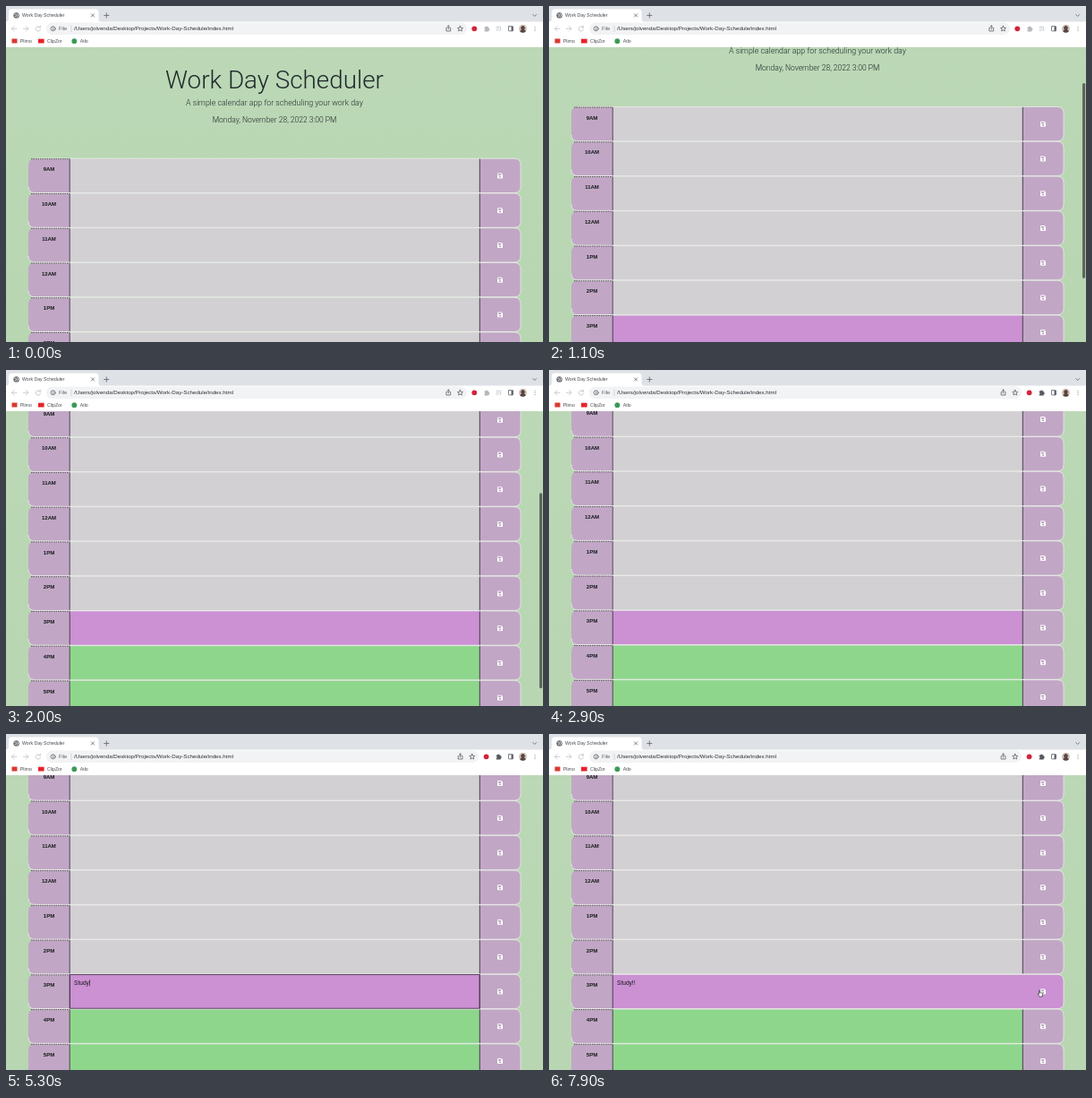
An HTML page that plays this animation: 600 by 375 pixels, repeating every 8 s.

```html
<!DOCTYPE html>
<html lang="en">
<head>
<meta charset="utf-8">
<title>Work Day Scheduler</title>
<style>
  html, body { margin: 0; width: 100%; height: 100%; overflow: hidden; }
  svg { display: block; width: 100vw; height: 100vh; }
  text { font-family: "Liberation Sans", Arial, sans-serif; fill: #15181b; white-space: pre; }
  .title, .lead { font-family: Roboto, "Helvetica Neue", sans-serif; font-weight: 300; text-anchor: middle; fill: #202a2c; }
  .title { font-size: 27.8px; }
  .lead { font-size: 8.8px; }
  .hour { font-size: 6px; font-weight: 700; text-anchor: middle; }
  .small { font-size: 5.2px; fill: #45494d; }
  .url { font-size: 6.2px; fill: #2c2f33; }
  .entry { font-size: 6.6px; }
  .icon { fill: none; stroke: #5f6368; stroke-width: .8; stroke-linecap: round; stroke-linejoin: round; }
  .faint { stroke: #bdc1c6; }
</style>
</head>
<body>
<svg viewBox="0 0 600 375" preserveAspectRatio="none">
  <defs>
    <linearGradient id="meadow" x1="0" y1="0" x2="0" y2="1">
      <stop offset="0" stop-color="#bcd8b7"/>
      <stop offset="1" stop-color="#b8d6b1"/>
    </linearGradient>
    <g id="disk">
      <path fill="#fff" d="M-3-2.2Q-3-3-2.2-3H1.5L3-1.5V2.2Q3 3 2.2 3H-2.2Q-3 3-3 2.2Z"/>
      <path fill="#b79bbb" d="M-2.1-2.1H1.2V-.5H-2.1Z"/>
      <circle cy="1.2" r="1" fill="#b79bbb"/>
    </g>
  </defs>

  <rect width="600" height="375" fill="url(#meadow)"/>

  <g id="page">
    <text class="title" x="300" y="91.8">Work Day Scheduler</text>
    <text class="lead" x="300" y="110.7">A simple calendar app for scheduling your work day</text>
    <text class="lead" x="300" y="130" style="font-size:8.5px">Monday, November 28, 2022 3:00 PM</text>
    <g id="rows"></g>
    <rect id="focus" x="71.4" width="457.8" height="37.6" fill="none" stroke="#4c3450" stroke-width=".9"/>
    <text id="entry" class="entry" x="76"></text>
    <rect id="caret" width=".6" height="7" fill="#111"/>
  </g>

  <rect id="thumb" x="596" width="3.2" height="218" rx="1.6" fill="#5d655b"/>

  <g id="browser">
    <rect width="600" height="18" fill="#dee1e6"/>
    <path fill="#fff" d="M0 17.5Q3 17.5 3 14.5V7Q3 3.5 6.5 3.5H100Q103.500 3.500 103.500 7V14.500Q103.500 17.500 106.500 17.500H600V46H0Z"/>
    <circle cx="11.6" cy="10.4" r="3.2" fill="#5f6368"/>
    <path d="M9.300 9.400Q11 8 11.500 9.800T9.800 12M12.500 8.200L14 10L12.300 12.500" fill="none" stroke="#fff" stroke-width=".8"/>
    <text class="small" x="18" y="12.300">Work Day Scheduler</text>
    <path class="icon" d="M95.300 8.800l3.300 3.300m0-3.300l-3.300 3.300M109.700 10.500h5.200m-2.600-2.600v5.200M588.800 9.600l1.900 1.900l1.900-1.900"/>
    <path class="icon faint" d="M12 25.300H6.500m2.600-2.600l-2.600 2.600l2.600 2.600M19.500 25.300H25m-2.600-2.600l2.600 2.600l-2.600 2.600"/>
    <path class="icon faint" d="M38 23.700A2.700 2.700 0 1 0 38.600 26M38.400 22.200V24H36.600"/>

    <rect id="pill" x="45" y="18.500" height="13.500" rx="6.700" fill="#f1f3f4"/>
    <circle class="icon" cx="52.600" cy="25.300" r="2.500" stroke-width=".6"/>
    <path class="icon" d="M52.600 25.200v1.300m0-2.500v.1"/>
    <text class="url" x="59" y="27.400" style="font-size:5.800px;fill:#5f6368">File</text>
    <path d="M73 21.500v7.500" stroke="#bfc3c8" stroke-width=".6"/>
    <text class="url" x="76" y="27.400">/Users/jolvenda/Desktop/Projects/Work-Day-Schedule/index.html</text>

    <g id="tools">
      <path class="icon" d="M492.700 24.500h-.8v3.500h4.800v-3.500h-.8M494.300 26v-4m-1.300 1.200l1.300-1.200l1.300 1.200" stroke-width=".7"/>
      <path class="icon" d="M507.500 22.300l.9 2l2.100.2l-1.600 1.400l.5 2.100l-1.900-1.100l-1.900 1.100l.5-2.100l-1.600-1.400l2.100-.2Z" stroke-width=".7"/>
      <circle cx="523.300" cy="25.300" r="2.900" fill="#d3233b"/>
      <path id="puzzle" d="M534.500 23.500h1.400a1.100 1.100 0 0 1 2.200 0h1.300v1.500a1.100 1.100 0 0 1 0 2.200v1.300h-4.900v-1.500a1.100 1.100 0 0 0 0-2.100Z"/>
    </g>
    <path id="media" class="icon faint" d="M548 23.200h4m-4 2h3m-3 2h2m2.700-3.500v3.600h-1"/>
    <rect class="icon" x="561.500" y="22.700" width="5" height="5.200" rx=".5"/>
    <path d="M564.500 22.700h2v5.200h-2Z" fill="#5f6368"/>
    <circle cx="577.500" cy="25.300" r="4.500" fill="#cfc3bb"/>
    <path fill="#58443f" d="M574.300 28.500Q574.700 26.700 576.300 26.300A2.200 2.200 0 1 1 578.700 26.300Q580.300 26.700 580.700 28.500A4.500 4.500 0 0 1 574.300 28.500Z"/>
    <path class="icon" d="M591 23.200v.1m0 2v.1m0 2v.1" stroke-width="1.100"/>

    <rect x="6.500" y="36.500" width="6" height="5" fill="#d93a30"/>
    <text class="small" x="15.800" y="41.100">Plimo</text>
    <rect x="36" y="36.700" width="6.600" height="4.800" fill="#e8202a"/>
    <text class="small" x="46" y="41.100">ClipZor</text>
    <circle cx="76.300" cy="39.200" r="2.900" fill="#3a9a58"/>
    <text class="small" x="82.800" y="41.100">Atlo</text>
  </g>

  <path id="hand" fill="#fff" stroke="#111" stroke-width=".6" stroke-linejoin="round"
    d="M-1 0Q-.3-.7.2 0V2.300L2.500 2.700Q3.300 3 3.200 3.800L2.700 6.500H-.3L-2.400 3.900Q-2.300 3-1 3.900Z"/>
</svg>

<script>
const LOOP = 8000, TOP = 170, PITCH = 38.75, ACTIVE = 6;
const HOURS = ['9AM', '10AM', '11AM', '12AM', '1PM', '2PM', '3PM', '4PM', '5PM'];
const LILAC = '#c1a7c5', PAST = '#d2d0d3', PRESENT = '#cb91d3', FUTURE = '#8fd68d';
const SCROLL = [[0, 0], [250, 0], [500, 9], [800, 28], [1500, 97], [2000, 133.8], [2300, 134.4]];
const HAND_X = [[7200, 440], [7600, 548.5]];
const HAND_Y = [[7200, 281], [7600, 286.5]];
const TYPING = [[4600, 'S'], [4800, 'St'], [4900, 'Stu'], [5000, 'Stud'], [5150, 'Study'], [6000, 'Study!'], [6200, 'Study!!']];
const FOCUS_AT = 4300, BLUR_AT = 7800, ACTIVATE_AT = 2800, HOVER_AT = 7500;

const $ = id => document.getElementById(id);
const set = (el, attrs) => { for (const k in attrs) el.setAttribute(k, attrs[k]); };
const show = (el, visible) => { el.style.display = visible ? '' : 'none'; };
const clamp = v => Math.max(0, Math.min(1, v));

function sample(keys, t) {
  const i = keys.findIndex(k => k[0] > t);
  if (i < 0) return keys[keys.length - 1][1];
  if (i === 0) return keys[0][1];
  const [t0, a] = keys[i - 1], [t1, b] = keys[i];
  return a + (b - a) * (t - t0) / (t1 - t0);
}

$('rows').innerHTML = HOURS.map((hour, i) => {
  const fill = i < ACTIVE ? PAST : i === ACTIVE ? PRESENT : FUTURE;
  return `<g transform="translate(0 ${TOP + i * PITCH})">
    <path d="M71 .4H32Q25 .4 25 7.400V31.300Q25 38.300 32 38.300H71Z" fill="${LILAC}"/>
    <path d="M71 .4H529V38.300H71Z" fill="${fill}"/>
    <path class="save" d="M529 .4H568Q575 .4 575 7.400V31.300Q575 38.300 568 38.300H529Z" fill="${LILAC}"/>
    <path d="M32 .2H568Q575 .2 575 7.400V31.300Q575 38.500 568 38.500H32Q25 38.500 25 31.300" fill="none" stroke="#f3f0f3" stroke-width=".7"/>
    <path d="M28 .7H71" stroke="#222" stroke-width=".7" stroke-dasharray="1.500 1"/>
    <path d="M71.200 .6V38.200" stroke="#33293a" stroke-width=".8"/>
    <path class="edge" d="M529.300 .6V38.200" stroke="#2a242c" stroke-width=".8"/>
    <text class="hour" x="48" y="14.400">${hour}</text>
    <use href="#disk" x="552" y="19.500"/>
  </g>`;
}).join('');

const activeRow = $('rows').children[ACTIVE];
const saveButton = activeRow.querySelector('.save');
const saveEdge = activeRow.querySelector('.edge');
const activeTop = TOP + ACTIVE * PITCH;
set($('focus'), { y: activeTop + .5 });
set($('entry'), { y: activeTop + 12.1 });
set($('caret'), { y: activeTop + 6.2 });

function render(t) {
  const scroll = sample(SCROLL, t);
  set($('page'), { transform: `translate(0 ${-scroll})` });
  set($('thumb'), { y: 47 + scroll * .675, opacity: clamp((t - 250) / 100) * clamp((2700 - t) / 250) });

  // The window gains focus: the media button leaves and the tools shift right.
  const active = t >= ACTIVATE_AT;
  set($('tools'), { transform: `translate(${active ? 13.3 : 0} 0)` });
  set($('pill'), { width: active ? 483 : 470 });
  set($('puzzle'), { fill: active ? '#55595e' : '#b4b8bd' });
  show($('media'), !active);

  const typed = TYPING.filter(k => k[0] <= t).pop();
  $('entry').textContent = typed ? typed[1] : '';
  const focused = t >= FOCUS_AT && t < BLUR_AT;
  const blinkStart = typed ? typed[0] : FOCUS_AT;
  show($('focus'), focused);
  show($('caret'), focused && (t - blinkStart) % 1000 < 500);
  set($('caret'), { x: 76.2 + (typed ? $('entry').getComputedTextLength() : 0) });

  const hover = clamp((t - HOVER_AT) / 150);
  saveButton.style.fill = `color-mix(in srgb, ${PRESENT} ${hover * 100}%, ${LILAC})`;
  set(saveEdge, { opacity: 1 - hover });
  show($('hand'), t >= HOVER_AT);
  set($('hand'), { transform: `translate(${sample(HAND_X, t)} ${sample(HAND_Y, t)})` });
}

function tick() {
  render(performance.now() % LOOP);
  requestAnimationFrame(tick);
}
tick();
</script>
</body>
</html>
```
